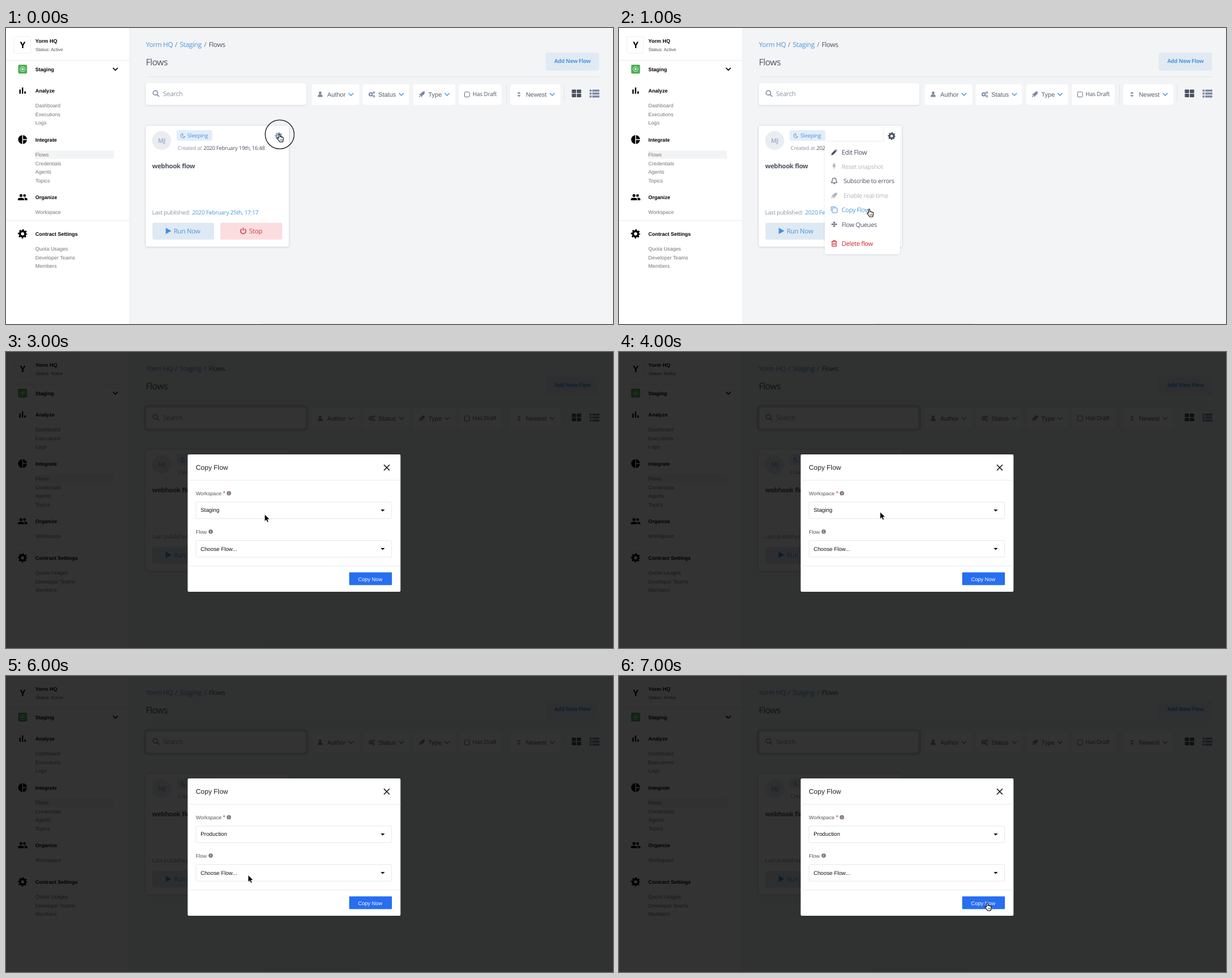
An HTML page for the animation above (8000 ms loop, 1024 by 500 pixels).

```html
<!DOCTYPE html>
<html lang="en">
<head>
<meta charset="utf-8">
<title>Copy a flow</title>
<style>
html, body { margin: 0; width: 100%; height: 100%; overflow: hidden; background: #f3f4f6; }
svg { display: block; width: 1024px; height: 500px; text-rendering: geometricPrecision; }
.sans { font-family: "Liberation Sans", Arial, sans-serif; }
.soft { font-family: "Open Sans", "Noto Sans", sans-serif; letter-spacing: -.03em; }
.b { font-weight: 700; }
</style>
</head>
<body>
<svg id="stage" viewBox="0 0 1024 500">
  <defs>
    <filter id="shadow" x="-10%" y="-10%" width="120%" height="130%">
      <feDropShadow dx="0" dy="1" stdDeviation="1.5" flood-color="#3a4a66" flood-opacity=".16"/>
    </filter>
  </defs>
</svg>
<script>
const STEP = 1000, LOOP = 8000;
const BLUE = '#4c98de', SLATE = '#4b5260', MUTED = '#8d96a5', STEEL = '#7d8ba6';

// Drawing helpers, each returns SVG markup
const text = (cls, x, y, s, size, fill, extra = '') =>
  `<text class="${cls}" x="${x}" y="${y}" font-size="${size}" fill="${fill}" ${extra}>${s}</text>`;
const sans = (...a) => text('sans', ...a);
const sansB = (...a) => text('sans b', ...a);
const soft = (...a) => text('soft', ...a);
const softB = (...a) => text('soft b', ...a);
const box = (x, y, w, h, fill, r = 0, extra = '') =>
  `<rect x="${x}" y="${y}" width="${w}" height="${h}" rx="${r}" fill="${fill}" ${extra}/>`;
const frame = (x, y, w, h, stroke, r = 0, width = 1) =>
  box(x, y, w, h, 'none', r, `stroke="${stroke}" stroke-width="${width}"`);
const dot = (x, y, r, fill, extra = '') => `<circle cx="${x}" cy="${y}" r="${r}" fill="${fill}" ${extra}/>`;
const ring = (x, y, r, stroke, width = 1, extra = '') =>
  dot(x, y, r, 'none', `stroke="${stroke}" stroke-width="${width}" ${extra}`);
const shape = (d, fill, extra = '') => `<path d="${d}" fill="${fill}" ${extra}/>`;
const line = (d, stroke, width = 1) =>
  shape(d, 'none', `stroke="${stroke}" stroke-width="${width}" stroke-linejoin="round"`);
const at = (x, y, s, scale = 1) => `<g transform="translate(${x} ${y}) scale(${scale})">${s}</g>`;
const group = (id, s) => `<g id="${id}">${s}</g>`;

// Icons
const gear = (x, y, r, color) => {
  const pitch = 2 * Math.PI * r * .83 / 8;
  return ring(x, y, r * .57, color, r * .44) +
    ring(x, y, r * .83, color, r * .34,
      `stroke-dasharray="${pitch * .52} ${pitch * .48}" stroke-dashoffset="${pitch * .26}"`);
};
const lens = (x, y, r, color, width) =>
  ring(x, y, r, color, width) + line(`M${x + r * .7} ${y + r * .7}l${r} ${r}`, color, width);
const chevron = (x, y, color, w = 4, width = 1.5) => line(`M${x - w} ${y - w / 2}l${w} ${w}l${w} ${-w}`, color, width);
const rocket = (x, y, color) =>
  at(x, y, shape('M5-5C1-5-1-3-2-1L-5 0L-3 1.5L-1.5 3L0 5L1 2C4 1 5-1 5-5ZM-4 2L-5 5L-2 4Z', color));
const people = (x, y) => at(x, y,
  dot(-2.7, -3, 2.5, '#000') + dot(3.3, -3, 2.3, '#000') +
  shape('M-8 5V3C-8 0 2.4 0 2.4 3V5ZM3.6 5V3Q3.6 1.5 2.6.6C5 .4 8 1.2 8 3V5Z', '#000'));
const info = (x, y) => dot(x, y, 3.6, '#777') + box(x - .5, y - .6, 1, 2.6, '#fff') + box(x - .5, y - 2, 1, 1, '#fff');
const caret = (y, up) => shape(`M632 ${up ? y + 2 : y - 1.5}h7l-3.5 ${up ? -3.5 : 3.5}z`, '#111');

// Cursors, placed by their top left corner
const arrow = (x, y) => at(x, y, shape('M0 0V11.8L2.7 9.3L4.5 13.3L6.6 12.4L4.8 8.5H8.6Z', '#000',
  'stroke="#fff" stroke-width=".6"'));
const hand = (x, y) => at(x, y,
  shape('M3 8V2.2C3 .3 5.2.3 5.2 2.2V5.4C6 4.6 7 5 7.3 5.9C8 5.3 9 5.6 9.3 6.4C10.3 6 11 6.6 11 7.8V10C11 11.6 10 12 10 14H4.7C4.4 12 2.2 10.8.7 8.5C0 7 1.7 6.4 3 8Z',
    '#fff', 'stroke="#111" stroke-width="1.1" stroke-linejoin="round"') +
  line('M5.8 9.2V12M7.4 9.2V12M9 9.2V12', '#111', .6));

function sidebar() {
  const sections = [
    ['Analyze', 109.4, ['Dashboard', 'Executions', 'Logs'], 134.4],
    ['Integrate', 191.9, ['Flows', 'Credentials', 'Agents', 'Topics'], 217.4],
    ['Organize', 289.2, ['Workspace'], 314.2],
    ['Contract Settings', 350.8, ['Quota Usages', 'Developer Teams', 'Members'], 376.4],
  ];
  const lists = sections.map(([head, y, items, top]) =>
    sansB(49.5, y, head, 8.6, '#000') +
    items.map((s, i) => sans(49.5, top + i * 14.4, s, 8.65, '#747474')).join('')).join('');
  return box(0, 0, 208, 500, '#fff') + box(208, 0, 1, 500, '#eceef1') +
    frame(13.5, 14.5, 28, 28, '#eeeff1', 2) +
    softB(28, 34, 'Y', 15, '#000', 'text-anchor="middle"') +
    sansB(49.5, 24.9, 'Yorm HQ', 8.7, '#000') + sans(49.8, 39.2, 'Status: Active', 7.7, '#555') +
    box(0, 54, 208, 1, '#ececec') + box(0, 325, 208, 1, '#ececec') +
    box(20.5, 62, 15, 15, '#4caf50', 2) + ring(28, 69.5, 4.2, '#e1f3e2', 1) + dot(28, 69.5, 2, '#e1f3e2') +
    sansB(49.5, 72.8, 'Staging', 8.6, '#000') + chevron(184.5, 69.3, '#111', 4, 1.7) +
    box(49, 207, 133, 14, '#f3f4f5') +
    box(22.5, 104, 2.3, 7, '#000') + box(26.8, 100.5, 2.3, 10.5, '#000') + box(31, 107, 2.3, 4, '#000') +
    dot(28, 188.5, 7.5, '#000') + line('M28 180V197M28 188.5H36', '#fff', 1.4) +
    people(28, 286) + gear(28, 347.7, 7.8, '#000') + lists;
}

function toolbar() {
  const pills = [[516, 80], [602, 78], [687, 71], [764, 72], [851, 84]];
  const labels = [['Author', 542, 582], ['Status', 628, 667], ['Type', 712.5, 744], ['Newest', 877, 921.5]];
  const grid = [954.5, 963].map(x => [104, 111].map(y => box(x, y, 7.3, 6, SLATE, .7)).join('')).join('');
  const rows = [104, 109, 114].map(y => box(984.5, y, 3.4, 3.4, STEEL, .5) + box(989, y, 12, 3.4, STEEL, .5)).join('');
  return soft(236, 32.2, 'Yorm HQ', 11.3, BLUE) + soft(285, 32.2, '/', 11.3, '#778') +
    soft(293, 32.2, 'Staging', 11.5, BLUE) + soft(334, 32.2, '/', 11.3, '#778') +
    soft(342, 32.2, 'Flows', 11.3, SLATE) + soft(236, 63.4, 'Flows', 14.9, SLATE) +
    box(910.5, 41.5, 90, 30.5, '#e1eaf3', 3) + softB(925, 59.3, 'Add New Flow', 9.2, BLUE) +
    box(236, 82, 765, 1, '#e4e6ea') +
    box(236, 93, 270.5, 37, '#fff', 4, 'filter="url(#shadow)"') +
    lens(252, 109.5, 3.8, STEEL, 1.6) + soft(265, 114.6, 'Search', 11.1, MUTED) +
    pills.map(([x, w]) => box(x, 95, w, 35, '#fff', 4)).join('') +
    labels.map(([s, x, cx]) => sans(x, 116, s, 10.5, '#555b68') + chevron(cx, 112, BLUE)).join('') +
    dot(530, 109.7, 2.4, STEEL) + shape('M526 116.5V115Q526 112 530 112T534 115V116.5Z', STEEL) +
    gear(615.3, 112, 4, STEEL) + gear(620.5, 109, 2.3, STEEL) + gear(620.5, 115.2, 2.3, STEEL) +
    rocket(701.5, 112, STEEL) +
    frame(773.5, 108, 8.5, 8.5, '#6a707c', 1.5) + soft(787, 115.4, 'Has Draft', 9.9, '#555b68') +
    shape('M862.3 111h6l-3-3.3zM862.3 113.2h6l-3 3.3z', STEEL) +
    box(844, 96, 1, 31, '#e2e5ea') + box(941, 96, 1, 28, '#e2e5ea') + grid + rows;
}

function card() {
  return box(235.5, 164.5, 242, 205, '#fff', 3, 'filter="url(#shadow)" stroke="#e4e7ec"') +
    dot(262.5, 190, 16, '#e9edf2') + softB(262.5, 194, 'MJ', 10.5, '#a5b4c9', 'text-anchor="middle"') +
    box(288, 172.5, 60, 18, '#e3edf8', 3) +
    line('M298.3 178.2a3.7 3.7 0 1 0 3.5 5.4a3.6 3.6 0 0 1 -3.5 -5.4z', BLUE, 1) +
    soft(306, 185, 'Sleeping', 9.4, BLUE) +
    soft(289.5, 205.6, 'Created at', 9, MUTED) + soft(333, 205.6, '2020 February 19th, 16:48', 9.1, SLATE) +
    gear(460, 182.5, 6.5, '#8ba0be') +
    softB(246.5, 237.2, 'webhook flow', 10.9, SLATE) +
    soft(246.5, 314.8, 'Last published:', 9.7, MUTED) + soft(314, 314.8, '2020 February 25th, 17:17', 9.8, BLUE) +
    box(247, 329, 104, 28.5, '#dfe9f3', 3) + shape('M269.5 337.5V348L279 342.7Z', '#3d93e0') +
    soft(283, 346.8, 'Run Now', 11.1, BLUE) +
    box(361.5, 329, 104.5, 28.5, '#fbdde0', 3) +
    line('M397.7 339.4a4.4 4.4 0 1 0 5 0M400.2 337.5v5', '#c9434a', 1.6) +
    soft(410, 346.8, 'Stop', 11.2, '#c9434a');
}

function menu() {
  const items = [
    ['Edit Flow', 375.5, 214.2, 11, SLATE], ['Reset snapshot', 375.5, 238.2, 10.4, '#b3b6bb'],
    ['Subscribe to errors', 378.7, 262.2, 10.3, SLATE], ['Enable real-time', 378.7, 287, 10.6, '#b3b6bb'],
    ['Copy Flow', 375.5, 311.2, 10.6, BLUE], ['Flow Queues', 375.5, 335.6, 10.5, SLATE],
    ['Delete flow', 375.5, 367.8, 10.8, '#d0222b'],
  ];
  const arm = [0, 90, 180, 270].map(a =>
    `<g transform="rotate(${a})">${shape('M-.6 0V-2.6H-2L0-5L2-2.6H.6V0Z', SLATE)}</g>`).join('');
  return shape('M351 191.5H447V172Q447 168 451 168H470Q474 168 474 172V378Q474 382 470 382H351Q347 382 347 378V195.5Q347 191.5 351 191.5Z',
    '#fff', 'filter="url(#shadow)"') + box(349, 191, 98, 1, '#eef0f3') +
    gear(460, 182.5, 6.5, SLATE) +
    at(363, 210, shape('M-5 5L-4.3 1.8L1.4-3.9L3.9-1.4L-1.8 4.3ZM2-4.5L3-5.2L5.2-3L4.5-2Z', SLATE)) +
    at(363, 234, shape('M-1.5-5H2L.8-1.8H3L-1.3 5.3L-.5.6H-3Z', '#b3b6bb')) +
    at(363, 258, line('M-4.8 3.2Q-3.2 1.6-3.2-1.2C-3.2-5.7 3.2-5.7 3.2-1.2Q3.2 1.6 4.8 3.2ZM-1.2 4.2Q0 6.4 1.2 4.2', SLATE, 1.1)) +
    rocket(363, 283, '#b3b6bb') +
    frame(360, 304, 8.2, 8.2, BLUE, 1) + line('M358 309.5V302H365.5', BLUE, 1) +
    at(363, 331.5, arm) +
    at(363, 364, line('M-4.5-3.5H4.5M-1.6-3.5V-5H1.6V-3.5M-3.5-3.5V4.8H3.5V-3.5M-1.3-1.5V3M1.3-1.5V3', '#d0222b', 1.1)) +
    items.map(([s, x, y, size, c]) => soft(x, y, s, size, c)).join('');
}

function modal() {
  return box(0, 0, 1024, 500, '#000', 0, 'opacity=".8"') +
    frame(234.5, 91.5, 273, 40, '#2a2a2b', 5, 4) +
    box(306.5, 173, 359, 232, '#fff', 2) +
    sans(320.3, 199, 'Copy Flow', 11.5, '#222') +
    line('M637.5 190.5l9.5 9.5m0-9.5l-9.5 9.5', '#111', 1.5) +
    box(306.5, 216, 359, 1, '#ebebeb') + box(306.5, 361, 359, 1, '#ebebeb');
}

const loading = () =>
  ring(486, 288.5, 10, '#ececec', 2) +
  line('M492.4 280.8A10 10 0 1 0 492.4 296.2', '#2f6bd3', 2.1) +
  box(579, 372.5, 72, 21.5, '#ededed', 1) +
  sans(594, 386.8, 'Copy Now', 8.85, '#e0e0e0');

const form = () =>
  sans(320.3, 242, 'Workspace', 8.7, '#555') + sans(366, 242, '*', 10, '#e02020') + info(376, 238.7) +
  frame(320.5, 253.5, 330, 28, '#e9e9e9', 1) +
  sans(320.3, 306.8, 'Flow', 8.7, '#555') + info(345.3, 303.3) +
  frame(320.5, 318.5, 330, 28, '#e9e9e9', 1) + sans(328.3, 335.6, 'Choose Flow...', 9.25, '#111') + caret(332.5) +
  box(579, 372.3, 72, 21.5, '#276ef1', 1) +
  sans(594, 386.8, 'Copy Now', 8.85, '#fff');

const picked = (s, up) => sans(328.3, 270.4, s, 9.35, '#111') + caret(267.5, up);

function options() {
  const names = [['Production', 337.3], ['Development', 358], ['Staging', 380.2], ['Testing', 402.6]];
  return box(320.5, 290.5, 330, 123, '#fff', 1, 'stroke="#ececec" stroke-width=".8"') +
    box(321, 318, 329, 1, '#ebebeb') + lens(334.8, 303.6, 3.2, '#111', 1.6) +
    line('M331.5 377.5l3.6 3.7l8-8.6', '#3b6cc0', 1.5) +
    names.map(([s, y]) => sans(353, y, s, 9.3, '#111')).join('');
}

const layers = {
  page: sidebar() + toolbar() + card() + box(430, 498.5, 168, 1.5, '#e9eaec', 1),
  press: ring(461.7, 179.7, 24.4, '#1a1a1a', 1.3),
  menu: menu(),
  modal: modal(),
  loading: loading(),
  form: form(),
  staging: picked('Staging'),
  opened: picked('Staging', true),
  production: picked('Production'),
  options: options(),
  cursor: '',
};

// One entry per second: visible layers and the cursor
const steps = [
  ['press', hand(457, 178.5)],
  ['menu', hand(418, 305)],
  ['modal loading', arrow(416, 306.5)],
  ['modal form staging', arrow(436.3, 274.3)],
  ['modal form staging', arrow(440.5, 270.3)],
  ['modal form opened options', hand(400, 335.5)],
  ['modal form production', arrow(408.5, 336.3)],
  ['modal form production', hand(617, 382.5)],
];

const stage = document.getElementById('stage');
stage.insertAdjacentHTML('beforeend', Object.entries(layers).map(([id, s]) => group(id, s)).join(''));
const nodes = Object.fromEntries(Object.keys(layers).map(id => [id, document.getElementById(id)]));
const start = performance.now();
let shown = -1;

function draw(now) {
  const i = Math.floor((Math.max(0, now - start) % LOOP) / STEP);
  if (i !== shown) {
    shown = i;
    const [names, cursor] = steps[i];
    const visible = new Set(['page', 'cursor', ...names.split(' ')]);
    for (const id in nodes) nodes[id].style.display = visible.has(id) ? '' : 'none';
    nodes.cursor.innerHTML = cursor;
  }
  requestAnimationFrame(draw);
}
draw(start);
</script>
</body>
</html>
```
